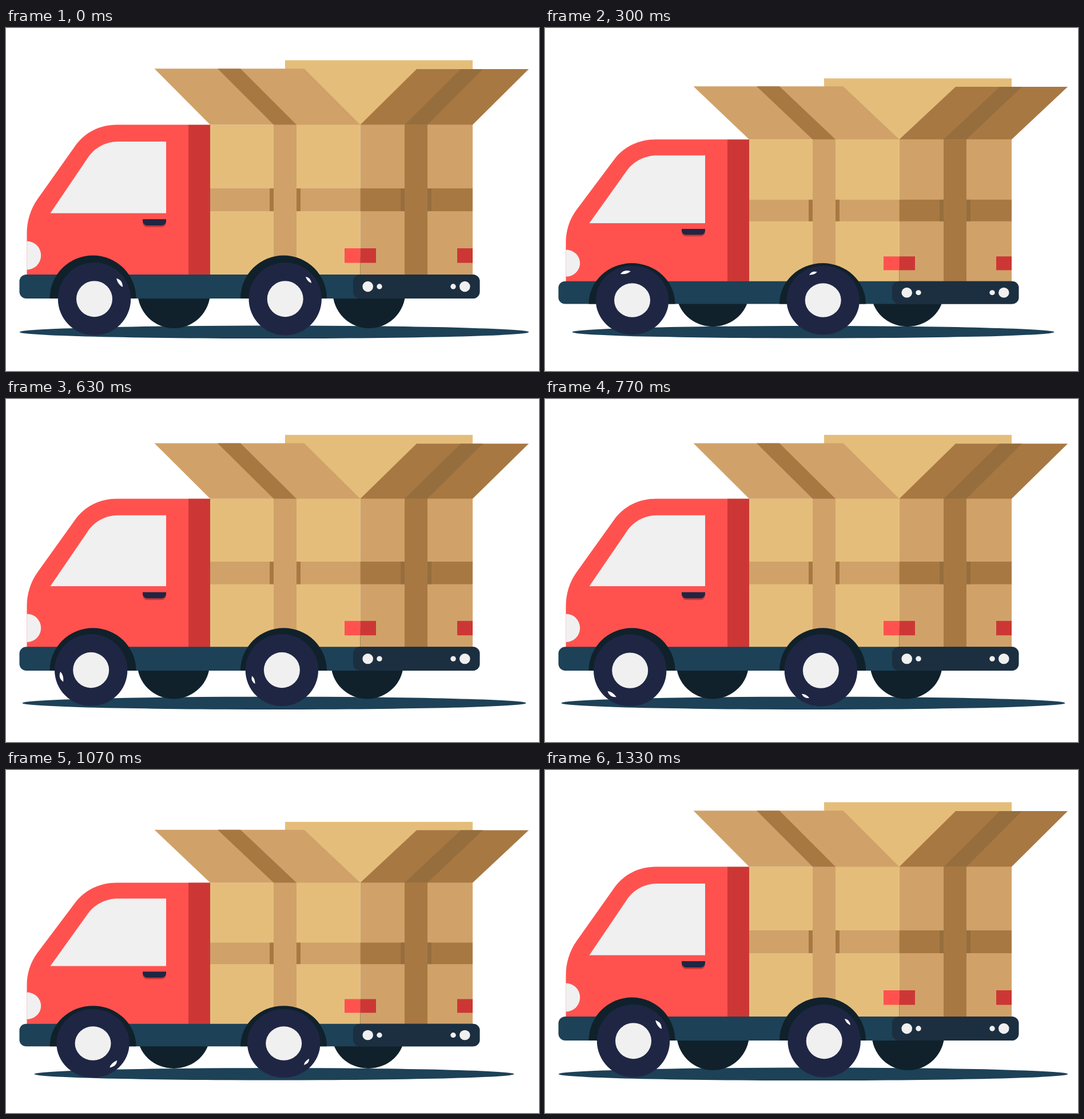
Animation of 932 by 601 pixels, one loop 1.36 s. Source, as an HTML page with a canvas:

```html
<!DOCTYPE html>
<html lang="en">
<head>
<meta charset="utf-8">
<title>Delivery truck</title>
<style>
  html, body { margin: 0; width: 100%; height: 100%; overflow: hidden; background: #fff; }
  canvas { display: block; }
</style>
</head>
<body>
<canvas id="stage" width="932" height="601"></canvas>
<script>
const ctx = document.getElementById('stage').getContext('2d');
const LOOP = 1360;
const STEPS = 36;
const SQUASH = 0.0593;

const RED = '#ff524f', DARK_RED = '#cc3735', LIGHT = '#f0f0f0', NAVY = '#1f2644';
const CHASSIS = '#1d4157', ARCH = '#10212b', BUMPER = '#1b2f40';
const CARD = '#e5bd7b', CARD_SHADE = '#d0a269', TAPE = '#a87843', TAPE_SHADE = '#966e3d';

function rect(color, left, top, right, bottom) {
  ctx.fillStyle = color;
  ctx.fillRect(left, top, right - left, bottom - top);
}

function rounded(color, left, top, right, bottom, radii) {
  ctx.fillStyle = color;
  ctx.beginPath();
  ctx.roundRect(left, top, right - left, bottom - top, radii);
  ctx.fill();
}

function ellipse(color, x, y, rx, ry = rx, from = 0, to = Math.PI * 2) {
  ctx.fillStyle = color;
  ctx.beginPath();
  ctx.ellipse(x, y, rx, ry, 0, from, to);
  ctx.fill();
}

function shape(color, d) {
  ctx.fillStyle = color;
  ctx.fill(new Path2D(d));
}

// Slanted flap between a top edge and the box rim
function flap(color, topLeft, topRight, top, rimLeft, rimRight) {
  shape(color, `M${topLeft} ${top}H${topRight}L${rimRight} 169.5H${rimLeft}Z`);
}

function drawBox() {
  rect(CARD, 488, 56.5, 816, 170);
  rect(CARD, 357, 169.5, 619.5, 433);
  rect(CARD_SHADE, 619.5, 169.5, 816, 433);

  rect(CARD_SHADE, 357, 281, 619.5, 321);
  rect(TAPE, 461, 281, 515, 321);
  rect(CARD_SHADE, 468, 169.5, 508, 433);

  rect(TAPE, 619.5, 281, 816, 321);
  rect(TAPE_SHADE, 690, 281, 744, 321);
  rect(TAPE, 697, 169.5, 737, 433);

  flap(CARD_SHADE, 259.5, 521.5, 71.3, 357, 619.5);
  flap(TAPE, 370, 410, 71.3, 468, 508);
  flap(TAPE, 718, 914, 72, 619.5, 816);
  flap(TAPE_SHADE, 795, 834, 72, 697, 737);

  rect(RED, 592, 386, 619.5, 411.5);
  rect(DARK_RED, 619.5, 386, 647, 411.5);
  rect(DARK_RED, 789, 386, 816, 411.5);
}

function drawCab() {
  shape(RED, 'M36.5 433V360C36.5 338 43 317 55 300L120 208C137 183 164 169.5 194 169.5H319V433Z');
  rect(DARK_RED, 319, 169.5, 357, 433);
  shape(LIGHT, 'M77.5 324.5L142 229C154 210 174 199 196 199H280V324.5Z');
  ellipse(LIGHT, 36.5, 398.5, 24.7, 25, -Math.PI / 2, Math.PI / 2);
  rounded(DARK_RED, 239, 338, 280, 349, [0, 0, 8, 8]);
  rounded(NAVY, 239, 335, 280, 346, [0, 0, 8, 8]);
}

function drawChassis() {
  rounded(CHASSIS, 23.5, 432, 828, 474, 12);
  for (const x of [152, 485.5]) ellipse(ARCH, x, 474, 75.5, 75.5, Math.PI, 0);
  rounded(BUMPER, 607, 432, 828.5, 474, 12);
  for (const side of [-1, 1]) {
    ellipse(LIGHT, 717.5 + side * 84.8, 453, 9.3);
    ellipse(LIGHT, 717.5 + side * 64.5, 453, 4.7);
  }
}

function drawWheel(x, y, flatten, angle, glintSize, glintTurn) {
  ctx.save();
  ctx.translate(x, y);
  ctx.scale(1, flatten);
  ellipse(NAVY, 0, 0, 63.7);
  ellipse(LIGHT, 0, 0, 31.5);
  ctx.rotate(-angle - glintTurn);
  ctx.translate(44.5, -28.5);
  ctx.scale(glintSize, glintSize);
  shape('#fff', 'M-6 -7.5Q5 -5 5 7.5Q-3 4 -6 -7.5Z');
  ctx.restore();
}

// Poses advance in 36 equal steps; a few ticks hold the previous pose
function stepAt(time) {
  const tick = Math.floor((time + 4) * 0.03);
  return Math.max(0, tick - 1 - Math.min(3, Math.floor(tick / 9)));
}

// Two bounces per turn: 0 is tall, 1 is squashed
function bounceAt(step) {
  const phase = step % 18 / 9;
  const x = phase > 1 ? 2 - phase : phase;
  const eased = x + 0.42 * x * (1 - x) ** 2;
  return (1 - Math.cos(Math.PI * eased)) / 2;
}

function draw(time) {
  const step = stepAt(time);
  const angle = step / STEPS * Math.PI * 2;
  const bounce = bounceAt(step);
  const flatten = 1 - SQUASH * bounce;
  const sway = Math.cos(angle);

  rect('#fff', 0, 0, 932, 601);
  ellipse(CHASSIS, 469, 532.8, 445.3 - 26.5 * bounce, 11.3 - 0.6 * bounce);
  ellipse(ARCH, 293.3 + 0.4 * sway, 462.5 + 0.6 * bounce, 63.5, 63.5 * flatten);
  ellipse(ARCH, 633.2 + 1.7 * sway, 462.5 + 0.6 * bounce, 63.5, 63.5 * flatten);

  ctx.save();
  ctx.translate(0, 653);
  ctx.scale(1, flatten);
  ctx.translate(0, -653);
  drawBox();
  drawCab();
  drawChassis();
  ctx.restore();

  const wheelY = 474.7 + 3.5 * bounce - 0.9 * Math.sin(angle);
  drawWheel(151.5 + 3 * sway, wheelY, flatten, angle, 1, 0);
  drawWheel(485.2 + 3 * sway, wheelY, flatten, angle, 0.8, 0.11);
}

function loop() {
  draw(performance.now() % LOOP);
  requestAnimationFrame(loop);
}
loop();
</script>
</body>
</html>
```
